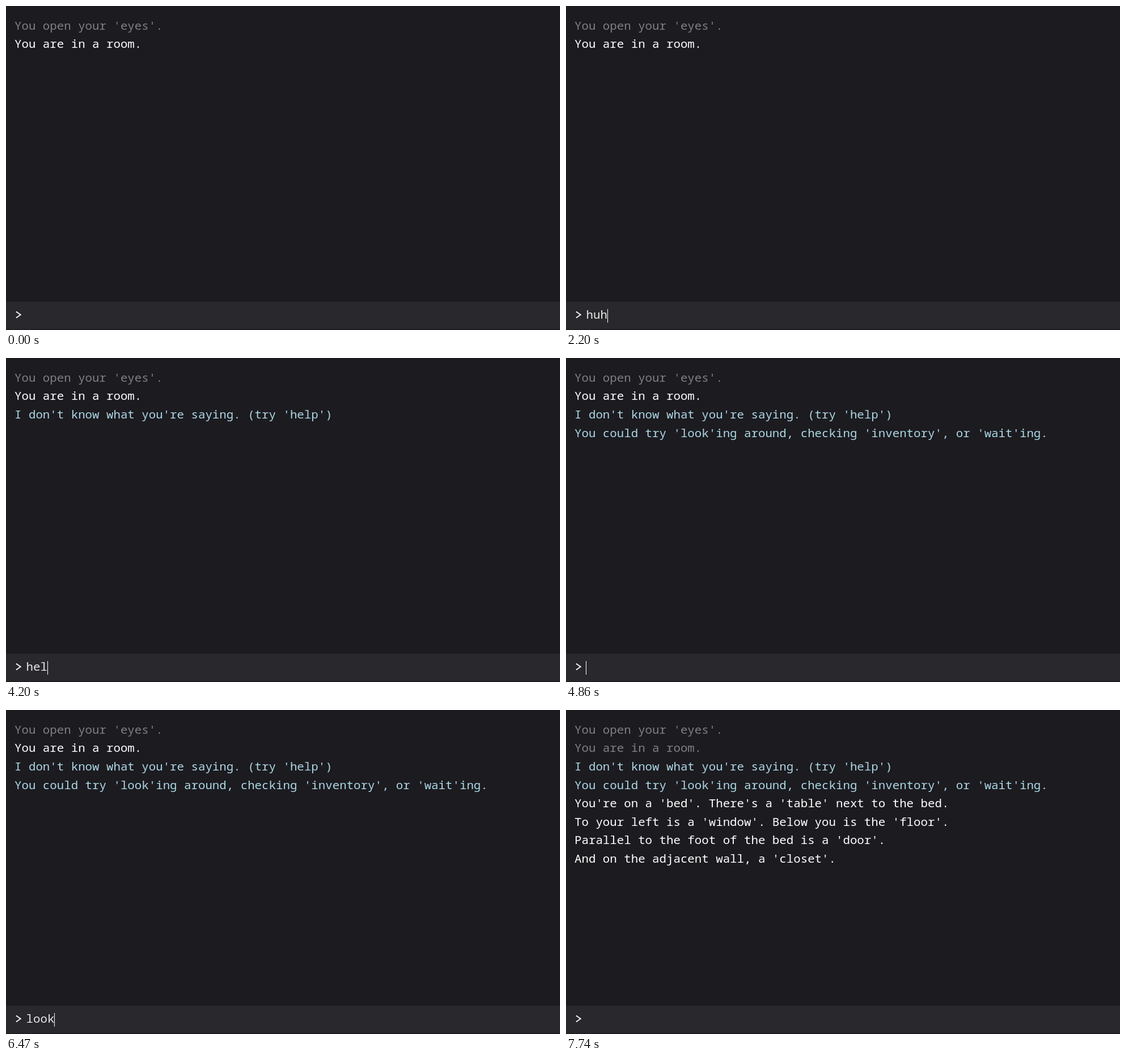
Write an HTML page that moves like this. It is 977 px wide and 573 px high and loops after 8000 ms.

```html
<!DOCTYPE html>
<html lang="en">
<head>
<meta charset="utf-8">
<title>Text adventure</title>
<style>
  html, body { margin: 0; width: 100%; height: 100%; overflow: hidden; background: #1c1b20; }
  svg { display: block; }
  text { font: 500 20.77px "Noto Sans Mono", "DejaVu Sans Mono", monospace; white-space: pre; }
</style>
</head>
<body>
<svg id="stage" width="977" height="573" viewBox="0 0 977 573">
  <rect width="977" height="573" fill="#1c1b20"/>
  <g id="log"></g>
  <rect y="523" width="977" height="48.5" fill="#29282d"/>
  <path d="M17.8 540.4 L25.8 546 L17.8 551.6" fill="none" stroke="#fff" stroke-width="1.8"/>
  <text id="typed" x="35.5" y="553" fill="#e8e8e8"></text>
  <rect id="caret" y="536" width="1" height="24" fill="#fff"/>
</svg>
<script>
const LOOP = 8000;
const ADVANCE = 12.46;
const DIM = '#808080', BRIGHT = '#ffffff', HINT = '#add8e6';
const LOOKED = 7140;

const lines = [
  { text: "You open your 'eyes'.", at: 0, color: DIM },
  { text: "You are in a room.", at: 0, color: BRIGHT, dimAt: LOOKED },
  { text: "I don't know what you're saying. (try 'help')", at: 2330, color: HINT },
  { text: "You could try 'look'ing around, checking 'inventory', or 'wait'ing.", at: 4860, color: HINT },
  { text: "You're on a 'bed'. There's a 'table' next to the bed.", at: LOOKED, color: BRIGHT },
  { text: "To your left is a 'window'. Below you is the 'floor'.", at: LOOKED, color: BRIGHT },
  { text: "Parallel to the foot of the bed is a 'door'.", at: LOOKED, color: BRIGHT },
  { text: "And on the adjacent wall, a 'closet'.", at: LOOKED, color: BRIGHT }
];

// Each command lists its key press times and the moment it is entered.
const commands = [
  { word: 'huh', keys: [1800, 2000, 2200], enter: 2330 },
  { word: 'help', keys: [4060, 4130, 4200, 4400], enter: 4860 },
  { word: 'look', keys: [6000, 6200, 6340, 6470], enter: LOOKED }
];

const caretSpans = [[600, 1190], [1800, 3000], [3660, 5470], [6000, 7740]];

const log = document.getElementById('log');
const typed = document.getElementById('typed');
const caret = document.getElementById('caret');

lines.forEach((line, row) => {
  line.node = document.createElementNS('http://www.w3.org/2000/svg', 'text');
  line.node.textContent = line.text;
  line.node.setAttribute('x', 15);
  line.node.setAttribute('y', Math.round(41.8 + row * 32.6));
  log.append(line.node);
});

const show = (node, visible) => node.setAttribute('visibility', visible ? 'visible' : 'hidden');

function typedAt(time) {
  const command = commands.find(c => time >= c.keys[0] && time < c.enter);
  return command ? command.word.slice(0, command.keys.filter(k => time >= k).length) : '';
}

function render(time) {
  for (const line of lines) {
    show(line.node, time >= line.at);
    line.node.setAttribute('fill', time >= line.dimAt ? DIM : line.color);
  }
  const input = typedAt(time);
  typed.textContent = input;
  caret.setAttribute('x', Math.round(35.4 + input.length * ADVANCE));
  show(caret, caretSpans.some(([on, off]) => time >= on && time < off));
}

let start;
function tick(now) {
  start ??= now;
  render((now - start) % LOOP);
  requestAnimationFrame(tick);
}
render(0);
requestAnimationFrame(tick);
</script>
</body>
</html>
```
